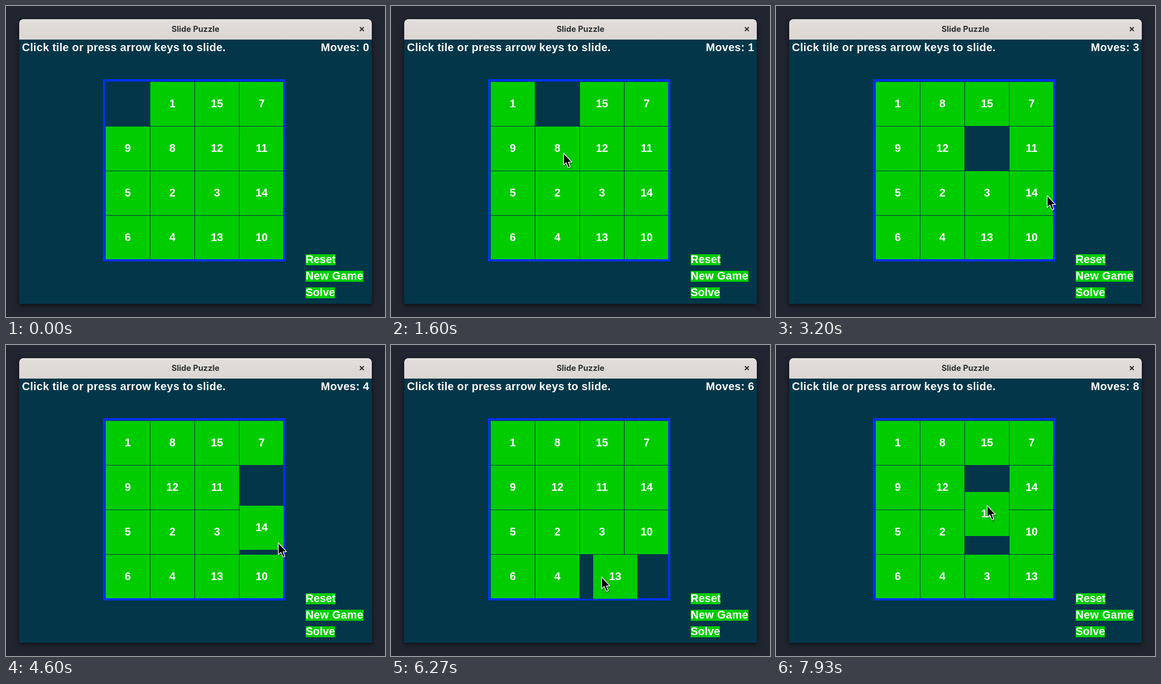
Recreate the animation shown at these times as an HTML page. Size 688x565 px, loop 8000 ms.

```html
<!DOCTYPE html>
<html lang="en">
<head>
<meta charset="utf-8">
<title>Slide Puzzle</title>
<style>
  html, body { margin: 0; width: 100%; height: 100%; overflow: hidden; background: #212530; }
  .window {
    position: absolute; left: 24px; top: 24px; width: 640px; height: 517px;
    border-radius: 8px 8px 0 0;
    background: linear-gradient(#e1dedb, #dad6d2 37px, #033649 37px);
    box-shadow: 0 3px 9px 1px rgba(0, 0, 0, .5), inset 0 1px rgba(255, 255, 255, .6);
  }
  svg { position: absolute; left: 0; top: 0; display: block; }
  text { font: bold 20px "Liberation Sans", Arial, sans-serif; fill: #fff; white-space: pre; }
  .wide { letter-spacing: .3px; }
  .title { font: bold 14.67px Inter, sans-serif; fill: #2d3133; }
  .tile text, .title { text-anchor: middle; }
  .green, .tile rect { fill: #00cc00; }
  #cursor { filter: drop-shadow(1px 2px 1px rgba(0, 0, 0, .4)); }
</style>
</head>
<body>
<div class="window"></div>
<svg width="688" height="565" viewBox="0 0 688 565">
  <text class="title" x="344" y="47">Slide Puzzle</text>
  <path d="M642.5 38.5l7 7m0-7l-7 7" stroke="#2d3133" stroke-width="2"/>
  <text class="wide" x="29" y="82">Click tile or press arrow keys to slide.</text>
  <text class="wide" id="moves" x="571.5" y="82">Moves: 0</text>

  <rect class="green" x="544" y="451" width="54" height="20"/>
  <text x="544" y="467">Reset</text>
  <rect class="green" x="544" y="481" width="105" height="20"/>
  <text class="wide" x="544" y="497">New Game</text>
  <rect class="green" x="544" y="511" width="53" height="20"/>
  <text x="544" y="527">Solve</text>

  <g id="board"></g>
  <rect x="178" y="135" width="327" height="327" fill="none" stroke="#0032ff" stroke-width="4"/>
  <rect id="hole" width="80" height="80" fill="#033649"/>
  <g id="lifted"></g>
  <path id="cursor" d="M1.3 1.3V23L6 18.6L9.6 27Q11.5 28 13.2 26L10 17.6H16.3Z"
        fill="#000" stroke="#fff" stroke-width="1.3" stroke-linejoin="round"/>
</svg>
<script>
  const LOOP = 8000, TICK = 200 / 3;         // picture refreshes 15 times a second
  const STEP = 100 / 3, SPEED = 8, STEPS = 11;
  const TRAVEL = 300, REST = 220;            // pointer travel, then pause before a click
  const SIZE = 81, X0 = 181, Y0 = 138;
  const START = "0 1 15 7 9 8 12 11 5 2 3 14 6 4 13 10".split(" ").map(Number);

  // Where the pointer clicks; cx, cy bend the way there
  const ENTRY = { x: 653, y: 262 };
  const CLICKS = [
    { t: 888, x: 287, y: 189 },
    { t: 1817, x: 312, y: 266 },
    { t: 2817, x: 399, y: 253, cx: 330, cy: 494 },
    { t: 3420, x: 491, y: 343 },
    { t: 3750, x: 486, y: 261 },
    { t: 4555, x: 493, y: 358 },
    { t: 5320, x: 490, y: 414 },
    { t: 6150, x: 381, y: 420 },
    { t: 7020, x: 388, y: 348, cx: 267, cy: 490 },
    { t: 7718, x: 382, y: 290 }
  ];

  const $ = id => document.getElementById(id);
  const board = $("board"), lifted = $("lifted"), hole = $("hole");
  const cursor = $("cursor"), moves = $("moves");
  const place = (el, x, y) => el.setAttribute("transform", `translate(${x} ${y})`);
  const col = cell => cell % 4, row = cell => cell >> 2;
  const cellAt = p => Math.floor((p.x - X0) / SIZE) + 4 * Math.floor((p.y - Y0) / SIZE);

  const tiles = Array.from({ length: 16 }, (_, n) => {
    const g = document.createElementNS("http://www.w3.org/2000/svg", "g");
    g.setAttribute("class", "tile");
    g.innerHTML = `<rect width="80" height="80"/><text x="40" y="46">${n}</text>`;
    return g;
  });

  function drawBoard(t) {
    const cells = START.slice();
    let done = 0, active = null;
    for (const click of CLICKS) {
      if (t < click.t) break;
      const from = cellAt(click), to = cells.indexOf(0);
      const dx = col(to) - col(from), dy = row(to) - row(from);
      if (Math.abs(dx) + Math.abs(dy) !== 1) continue;   // only neighbours of the gap slide
      const k = Math.floor((t - click.t) / STEP);
      if (k < STEPS) { active = { from, dx, dy, shift: k * SPEED }; break; }
      cells[to] = cells[from];
      cells[from] = 0;
      done++;
    }

    hole.style.display = active ? "" : "none";
    cells.forEach((n, cell) => {
      if (!n) return;
      let x = X0 + SIZE * col(cell), y = Y0 + SIZE * row(cell), layer = board;
      if (active && active.from === cell) {
        place(hole, x, y);
        x += active.dx * active.shift;
        y += active.dy * active.shift;
        layer = lifted;
      }
      if (tiles[n].parentNode !== layer) layer.append(tiles[n]);
      place(tiles[n], x, y);
    });
    moves.textContent = "Moves: " + done;
  }

  function drawCursor(t) {
    const leave = click => click.t - REST - TRAVEL;
    const i = CLICKS.filter(click => leave(click) <= t).length - 1;
    cursor.style.display = i < 0 ? "none" : "";
    if (i < 0) return;
    const a = CLICKS[i - 1] || ENTRY, b = CLICKS[i];
    const { cx = (a.x + b.x) / 2, cy = (a.y + b.y) / 2 } = b;
    const f = Math.min(1, (t - leave(b)) / TRAVEL), e = f * f * (3 - 2 * f);
    const curve = (p, c, q) => Math.round((1 - e) ** 2 * p + 2 * e * (1 - e) * c + e * e * q);
    place(cursor, curve(a.x, cx, b.x), curve(a.y, cy, b.y));
  }

  function draw(now) {
    const t = Math.floor((now % LOOP + 4) / TICK) * TICK + .5;
    drawBoard(t);
    drawCursor(t);
  }

  const origin = performance.now();
  function frame() {
    draw(performance.now() - origin);
    requestAnimationFrame(frame);
  }
  frame();
</script>
</body>
</html>
```
